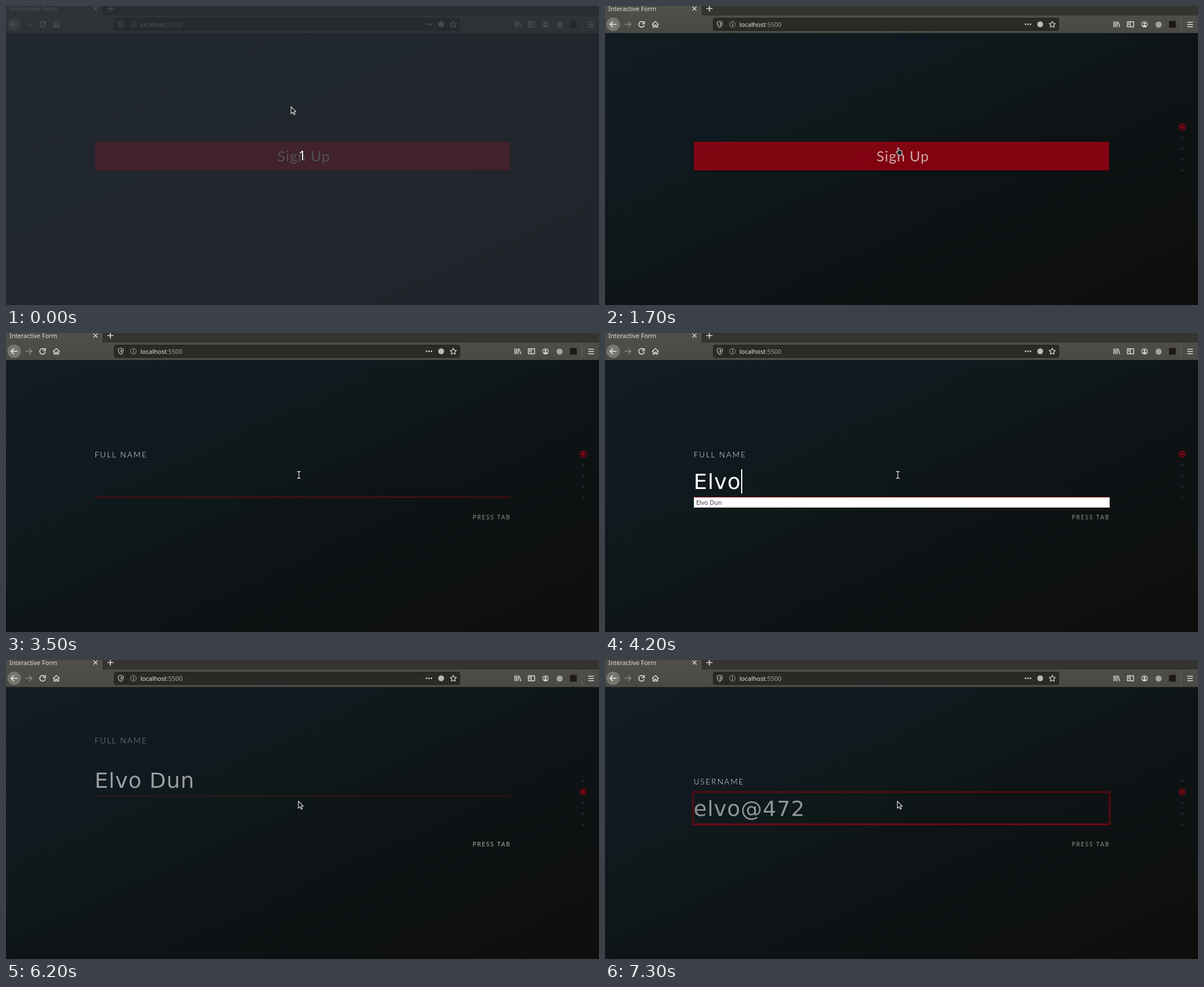
Animation, 1054 px wide and 531 px high, one loop 8000 ms. Source, as an HTML page with a canvas:

```html
<!DOCTYPE html>
<html lang="en">
<head>
<meta charset="utf-8">
<title>Interactive Form</title>
<style>
html, body { margin: 0; width: 100%; height: 100%; overflow: hidden; background: #0e1316; }
canvas { display: block; width: 1054px; height: 531px; }
</style>
</head>
<body>
<canvas id="stage" width="1054" height="531"></canvas>
<script>
const W = 1054, H = 531, LOOP = 8000, STEP = 100;
const LEFT = 157.5, RIGHT = 896, RED = '#a80012';
const FULL_NAME = 'Elvo Dun', USER_NAME = 'elvo@472';
const FIELD_FONT = '38px "DejaVu Sans", sans-serif';
const UI_FONT = '11px "Noto Sans", sans-serif';
const ctx = document.getElementById('stage').getContext('2d');

const clamp = v => Math.max(0, Math.min(1, v));
const progress = (t, from, to) => clamp((t - from) / (to - from));

function withAlpha(alpha, draw) {
  if (alpha <= 0) return;
  ctx.save();
  ctx.globalAlpha *= alpha;
  draw();
  ctx.restore();
}

function rect(x, y, w, h, color) {
  ctx.fillStyle = color;
  ctx.fillRect(x, y, w, h);
}

function text(str, x, y, font, color, spacing = 0) {
  ctx.font = font;
  ctx.letterSpacing = spacing + 'px';
  ctx.fillStyle = color;
  ctx.fillText(str, x, y);
  return ctx.measureText(str).width;
}

function disc(x, y, r, color) {
  ctx.fillStyle = color;
  ctx.beginPath();
  ctx.arc(x, y, r, 0, 7);
  ctx.fill();
}

function ring(x, y, r, color, width = 1.2) {
  ctx.strokeStyle = color;
  ctx.lineWidth = width;
  ctx.beginPath();
  ctx.arc(x, y, r, 0, 7);
  ctx.stroke();
}

function path(d, x, y, stroke, width, fill) {
  ctx.save();
  ctx.translate(x, y);
  const p = new Path2D(d);
  if (fill) { ctx.fillStyle = fill; ctx.fill(p); }
  if (stroke) {
    ctx.strokeStyle = stroke;
    ctx.lineWidth = width;
    ctx.lineJoin = 'round';
    ctx.stroke(p);
  }
  ctx.restore();
}

function drawBackground() {
  const g = ctx.createLinearGradient(344, -109.5, 710, 688.5);
  const stops = [[0, '#111d22'], [.28, '#10191f'], [.4, '#0f1919'],
    [.52, '#0e1416'], [.75, '#0e1112'], [1, '#100e0c']];
  for (const [at, color] of stops) g.addColorStop(at, color);
  rect(0, 48, W, H - 48, g);
}

function drawChrome() {
  const icon = '#dcdad5';
  rect(0, 0, W, 17, '#353430');
  const bar = ctx.createLinearGradient(0, 0, 0, 48);
  bar.addColorStop(0, '#504f4a');
  bar.addColorStop(1, '#4a4945');
  rect(0, 17, W, 31, bar);
  rect(0, 0, 172, 17, bar);
  rect(172, 0, 1, 17, '#2a2926');
  text('Interactive Form', 6, 8.5, UI_FONT, '#e0ded9');
  path('M-3.5 -3.5 L3.5 3.5 M3.5 -3.5 L-3.5 3.5', 159, 4.5, icon, 1.4);
  path('M-5.5 0 H5.5 M0 -5.5 V5.5', 185.5, 4.5, icon, 1.7);

  disc(14.5, 32.5, 12, '#767570');
  path('M6 0 H-5.5 M-.5 -5 L-5.5 0 L-.5 5', 14.5, 32.5, '#f0eeea', 1.7);
  path('M-6 0 H5.5 M.5 -5 L5.5 0 L.5 5', 40.5, 32.5, '#8b8a85', 1.6);
  path('M4 -3 A5 5 0 1 0 4.8 1.5 M5 -5.5 V-1 H.5', 65, 32.5, icon, 1.7);
  path('M-6 .5 L0 -5 L6 .5 M-4 -.5 V5 H-1.2 V1.5 H1.2 V5 H4 V-.5', 89.5, 32.5, icon, 1.6);

  ctx.beginPath();
  ctx.roundRect(192.5, 21.5, 614, 22, 3);
  ctx.fillStyle = '#2b2a26';
  ctx.fill();
  ctx.strokeStyle = '#1f1e1b';
  ctx.lineWidth = 1;
  ctx.stroke();
  rect(215, 22, 1, 21, '#1f1e1b');
  path('M0 -5.5 L4.5 -4 Q4.8 3 0 5.5 Q-4.8 3 -4.5 -4 Z', 204, 32.5, '#b9b8b3', 1.3);
  path('M0 -3 V3 Q2.5 1.5 2.5 -2.3 Z', 204, 32.5, null, 0, '#b9b8b3');
  ring(226.5, 32.5, 5, '#a9a8a3', 1);
  rect(226, 31.5, 1.2, 4, '#b9b8b3');
  rect(226, 29.2, 1.2, 1.4, '#b9b8b3');
  const host = text('localhost', 239, 37, UI_FONT, '#e8e6e1');
  text(':5500', 239 + host, 37, UI_FONT, '#a5a39e');
  for (let i = 0; i < 3; i++) disc(747.5 + i * 4.3, 32.5, 1.4, '#cfcdc8');
  disc(773.5, 32.5, 5.2, '#bcbab5');
  path('M0 -5.5 L1.7 -1.9 L5.5 -1.5 L2.7 1.2 L3.5 5.2 L0 3.2 L-3.5 5.2 L-2.7 1.2 L-5.5 -1.5 L-1.7 -1.9 Z',
    795, 32.5, icon, 1.2);

  path('M-4.5 -5 V5 M-1.7 -5 V5 M1.2 -5 V5 M3 -4.5 L6 5', 909, 32.5, icon, 1.5);
  path('M-5.5 -4.5 H5.5 V4.5 H-5.5 Z M-.5 -4.5 V4.5 M-4 -2 H-2 M-4 .5 H-2', 934, 32.5, icon, 1.5);
  ring(959, 32.5, 5, icon, 1.2);
  disc(959, 31, 2, icon);
  path('M-3.4 3 Q0 -.8 3.4 3 Q0 6 -3.4 3 Z', 959, 32.5, null, 0, icon);
  disc(984, 33, 5.5, '#a3a29d');
  rect(1002.5, 26.5, 12, 12, '#1c1913');
  rect(1023, 19, 1, 27, '#64635d');
  for (let i = -1; i < 2; i++) rect(1035, 32 + i * 4, 10, 1.5, icon);
}

function drawSteps(active) {
  for (let i = 0; i < 5; i++) {
    const y = 215 + i * 19.3;
    if (i === active) {
      ring(1026, y, 5.3, RED, 1.4);
      disc(1026, y, 2.5, RED);
    } else disc(1026, y, 2.3, '#1c2529');
  }
}

function drawButton(alpha) {
  withAlpha(alpha, () => {
    ctx.save();
    ctx.shadowColor = 'rgba(0,0,0,.5)';
    ctx.shadowBlur = 6;
    ctx.shadowOffsetY = 2;
    rect(158, 241, 738, 51, RED);
    ctx.restore();
    text('Sign Up', 482.5, 276, '25.6px Lato, sans-serif', '#e8dcda', 1);
  });
}

function drawLabel(str, dy, alpha) {
  withAlpha(alpha, () => text(str, LEFT, 221 + dy, '300 14px Lato, sans-serif', '#eceeee', 1.9));
}

function drawField(value, { dy = 0, alpha = 1, hint = false, caret = false, glow = false }) {
  withAlpha(alpha, () => {
    if (glow) {
      ctx.save();
      ctx.shadowColor = '#c00014';
      ctx.shadowBlur = 3;
      ctx.strokeStyle = '#74080f';
      ctx.lineWidth = 1;
      ctx.strokeRect(156.5, 234.5 + dy, 740.5, 57.5);
      ctx.restore();
    }
    rect(LEFT, 291 + dy, RIGHT - LEFT, 1, glow ? RED : '#900711');
    const width = text(value, LEFT, 277 + dy, FIELD_FONT, hint ? 'rgba(255,255,255,.54)' : '#fff', 1);
    if (caret) rect(Math.round(LEFT + (hint ? 0 : width)), 242 + dy, 2, 43, '#fff');
  });
}

function drawPressTab(alpha) {
  withAlpha(alpha, () => text('PRESS TAB', 829.5, 330.5, '10.5px Lato, sans-serif', '#eef0f0', 1.7));
}

function drawSuggestion(selected) {
  rect(158, 292, 739, 18, selected ? '#f07746' : '#fff');
  text(FULL_NAME, 162, 305, UI_FONT, selected ? '#fff' : '#3c3c3c');
}

function drawNameSection(t) {
  if (t < 1700) return;
  const enter = progress(t, 1700, 2100);
  const exit = progress(t, 5850, 6680);
  const alpha = enter * (1 - exit);
  let value = '';
  if (t >= 4900) value = FULL_NAME;
  else if (t >= 4200) value = FULL_NAME.slice(0, 4);
  else if (t >= 4100) value = FULL_NAME.slice(0, 3);
  else if (t >= 3700) value = FULL_NAME.slice(0, 2);
  else if (t >= 3600) value = FULL_NAME.slice(0, 1);
  const hint = t < 3500;
  drawLabel('FULL NAME', -22 * (1 - enter) - 173 * exit, alpha);
  drawField(hint ? FULL_NAME : value, {
    dy: -118.5 * exit, alpha, hint,
    caret: (t >= 2200 && t < 2500) || (t >= 3600 && t < 5900)
  });
  if (t >= 3600 && t < 5100) drawSuggestion(t >= 4900);
}

function drawUserSection(t) {
  if (t <= 6200) return;
  const alpha = progress(t, 6200, 6700);
  drawLabel('USERNAME', 240 * (1 - alpha) ** 2, alpha);
  drawField(USER_NAME, {
    dy: 240 * (1 - progress(t, 6200, 6800)) ** 2,
    alpha, hint: true, glow: true, caret: t >= 6800 && t < 7300
  });
}

function drawArrow(x, y) {
  path('M.7 .7 V13.3 L3.7 10.6 L5.7 15 L7.8 14.1 L5.9 9.8 H9.6 Z', x, y, '#f2f2f2', 1.1, '#15191b');
}

function drawHand(x, y) {
  path('M3.2 8 V1.7 Q4.2 -.2 5.2 1.7 V5 L10 6 Q11.6 6.6 11.2 8.5 L10 14 H4.6 L.8 8.5 Q.8 6.8 3.2 8 Z',
    x, y, '#e6e8e8', 1.1, '#1b2326');
}

function drawBeam(x, y) {
  const shape = 'M-3 -6 H-1 L0 -5 L1 -6 H3 M0 -5 V5 M-3 6 H-1 L0 5 L1 6 H3';
  path(shape, x, y, '#000', 3);
  path(shape, x, y, '#f2f2f2', 1.3);
}

function drawPointer(t) {
  if (t < 100) drawArrow(506, 178);
  else if (t < 400) drawArrow(508, 184);
  else if (t < 600) drawArrow(508, 191);
  else if (t < 700) drawArrow(512, 208);
  else if (t < 800) drawArrow(517, 232);
  else if (t < 1300) drawHand(520, 262);
  else if (t < 2100) drawHand(517, 251);
  else if (t < 5900) drawBeam(520.5, 252);
  else drawArrow(519, 250);
}

function drawCountdown() {
  rect(0, 0, W, H, 'rgba(39,44,51,.786)');
  ctx.save();
  ctx.shadowColor = '#000';
  ctx.shadowBlur = 3;
  ctx.shadowOffsetX = 1;
  ctx.shadowOffsetY = 1;
  text('1', 520, 274, '500 23px "Noto Sans", sans-serif', '#fff');
  ctx.restore();
}

function render(t) {
  drawBackground();
  drawChrome();
  drawSteps(t < 1500 ? -1 : t < 6000 ? 0 : 1);
  drawButton(1 - progress(t, 1500, 2330));
  drawNameSection(t);
  drawUserSection(t);
  drawPressTab(progress(t, 1700, 2100) * (t >= 5900 && t < 6700 ? .7 : .57));
  if (t < 100) drawCountdown();
  drawPointer(t);
}

const start = performance.now();
function tick() {
  const t = (performance.now() - start) % LOOP;
  render(Math.floor(t / STEP) * STEP);
  requestAnimationFrame(tick);
}
tick();
</script>
</body>
</html>
```
